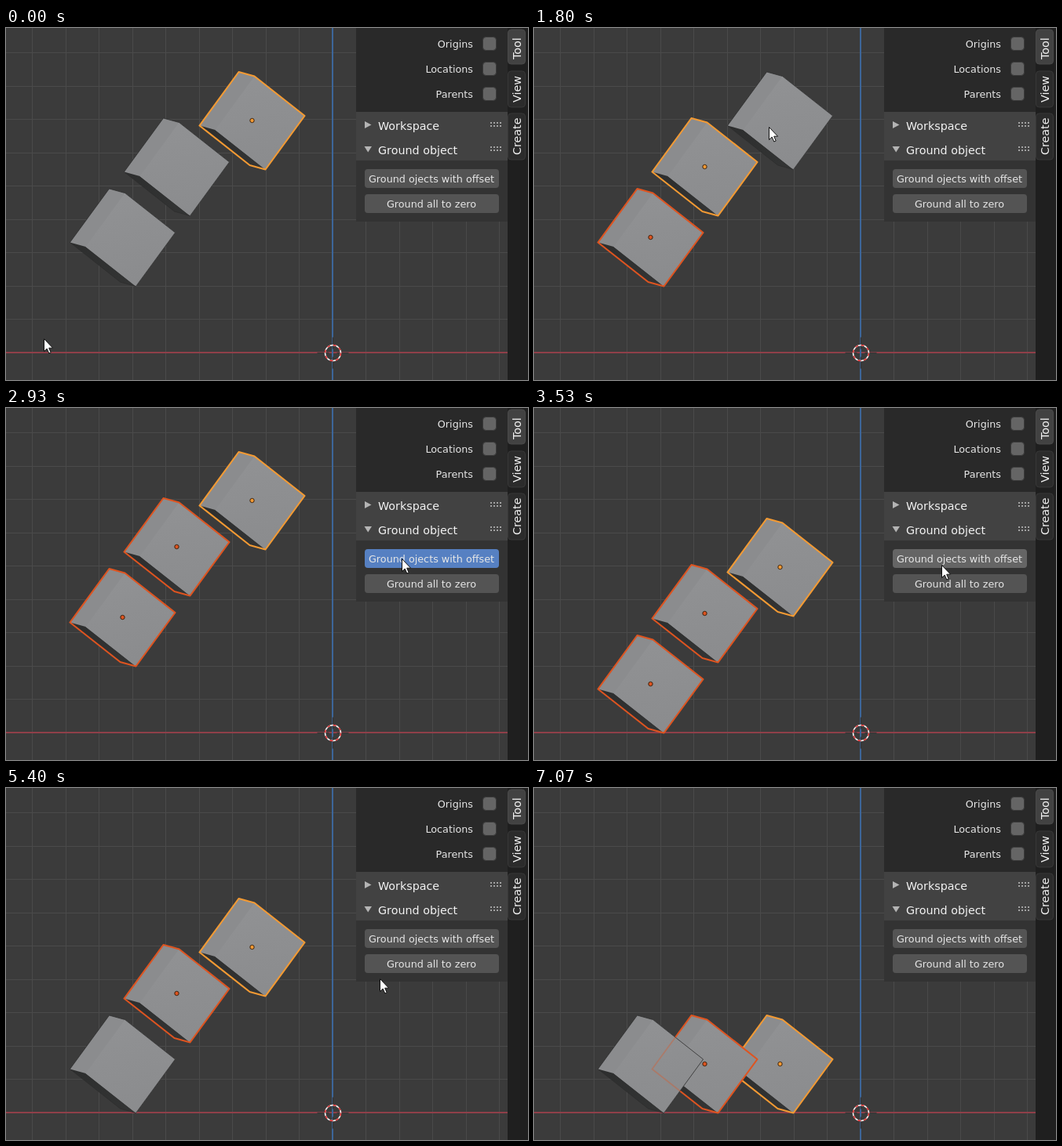
These frames come from a looping animation (665 by 449 pixels, 8190 ms). An HTML page:

```html
<!DOCTYPE html>
<html lang="en">
<head>
<meta charset="utf-8">
<title>Ground object</title>
<style>
  html, body { margin: 0; width: 100%; height: 100%; overflow: hidden; background: #3b3b3b; }
  svg { display: block; width: 665px; height: 449px; }
  text { font-family: "DejaVu Sans", Verdana, sans-serif; fill: #e6e6e6; }
  .item { font-size: 12.75px; }
  .head { font-size: 14.3px; fill: #f2f2f2; }
</style>
</head>
<body>
<svg id="stage" viewBox="0 0 665 449" xmlns="http://www.w3.org/2000/svg">
  <defs>
    <linearGradient id="front" x1="0" y1="0" x2="0.25" y2="1">
      <stop offset="0" stop-color="#919294"/><stop offset="1" stop-color="#8b8c8e"/>
    </linearGradient>
    <linearGradient id="under" x1="0" y1="0" x2="1" y2="1">
      <stop offset="0" stop-color="#292a2a"/><stop offset="1" stop-color="#363737"/>
    </linearGradient>
  </defs>
  <g id="grid"></g>
  <g id="cubes"></g>
  <g id="pivot"></g>
  <g id="panel"></g>
  <path id="arrow" d="M-.5 .5V16.6L3.2 13.1 5.8 19 8.2 18 5.7 12.2H10.6Z" fill="#fff" stroke="#111" stroke-width="1"/>
</svg>
<script>
const $ = id => document.getElementById(id);
const NS = "http://www.w3.org/2000/svg";

function add(parent, tag, attrs, text) {
  const el = document.createElementNS(NS, tag);
  for (const k in attrs) el.setAttribute(k, attrs[k]);
  if (text) el.textContent = text;
  parent.appendChild(el);
  return el;
}
const rect = (p, x, y, width, height, fill, rx = 0) => add(p, "rect", { x, y, width, height, fill, rx });
const line = (p, x1, y1, x2, y2, stroke, w = 1) =>
  add(p, "line", { x1, y1, x2, y2, stroke, "stroke-width": w });
const show = (el, on) => { el.style.display = on ? "" : "none"; };

// Grid, axes and the 3D cursor
const AX = 416, AY = 414, CELL = 42.5;
const grid = $("grid");
for (let i = -9; i <= 5; i++) {
  const x = Math.floor(AX + i * CELL) + 0.5, y = Math.floor(AY + i * CELL) + 0.5;
  line(grid, x, 0, x, 449, "#4a4a4a");
  line(grid, 0, y, 639, y, "#4a4a4a");
}
line(grid, 0, AY, 639, AY, "#8f3f49", 2);
line(grid, AX, 0, AX, 449, "#3d6699", 2);

const pivot = add($("pivot"), "g", { transform: `translate(${AX + 0.5} ${AY + 0.5})` });
for (let turn = 0; turn < 360; turn += 90)
  line(pivot, 5, 0, 20, 0, "#373737", 1.5).setAttribute("transform", `rotate(${turn})`);
const ring = { r: 10, fill: "none", "stroke-width": 1.5 };
add(pivot, "circle", { ...ring, stroke: "#f4f4f4" });
add(pivot, "circle", { ...ring, stroke: "#e02a2a", "stroke-dasharray": 10 * Math.PI / 8 });

// A cube is its top corner plus three projected edges: a narrow, b left, c right
const EDGES = { a: [20, 5.5], b: [-50, 68.5], c: [64, 50.5] };
const corner = name => [...name].reduce(
  ([x, y], e) => EDGES[e] ? [x + EDGES[e][0], y + EDGES[e][1]] : [x, y], [-17, -62]).join();
const face = names => names.split(" ").map(corner).join(" ");
const HULL = face("o a ac abc bc b");

const ORANGE = "#f39a33", RED = "#de5420";
const STEP = 85, FLOOR = 352;
const homes = [[148.5, 267], [217.5, 177], [313.5, 118]];
const layer = $("cubes");
const cubes = homes.map(() => ({}));
for (const c of [...cubes].reverse()) {
  c.g = add(layer, "g", {});
  add(c.g, "polygon", { points: HULL, fill: "url(#under)" });
  add(c.g, "polygon", { points: face("o a ac abc ab b"), fill: "#8b8c8e" });
  add(c.g, "polygon", { points: face("a ac abc ab"), fill: "url(#front)" });
  c.edge = add(c.g, "polygon", { points: HULL, fill: "none", "stroke-linejoin": "round" });
}
// Outline of the middle cube seen faintly through the unselected one
const clip = add(layer, "clipPath", { id: "mask" });
add(clip, "polygon", { points: HULL, transform: `translate(${homes[0][0]} ${FLOOR})` });
const ghost = add(add(layer, "g", { "clip-path": "url(#mask)" }), "polygon", {
  points: HULL, transform: `translate(${homes[1][0]} ${FLOOR})`, fill: "none",
  stroke: RED, "stroke-width": 1.8, opacity: 0.35
});
for (const c of cubes)
  c.dot = add(layer, "circle", { r: 2.7, stroke: "#3a2412", "stroke-width": 1 });

// Side panel
const panel = $("panel");
rect(panel, 446, 0, 193, 107, "#292929");
rect(panel, 446, 107, 193, 62, "#424242");
rect(panel, 446, 169, 193, 78, "#333333");
rect(panel, 639, 0, 26, 449, "#1f1f1f");

["Origins", "Locations", "Parents"].forEach((label, i) => {
  const y = 24.5 + i * 32;
  add(panel, "text", { x: 595, y, class: "item", "text-anchor": "end" }, label);
  rect(panel, 607.5, y - 13, 17, 17, "#656565", 4).setAttribute("stroke", "#3a3a3a");
});
["Workspace", "Ground object"].forEach((label, i) => {
  const y = 129.5 + i * 31;
  add(panel, "text", { x: 474, y, class: "head" }, label);
  for (let k = 0; k < 8; k++)
    rect(panel, 617 + (k % 4) * 4, y - 9.5 + (k >> 2) * 4, 2, 2, "#a2a2a2");
});
add(panel, "path", { d: "M457 119L465.5 123.5 457 128ZM456.5 151H466L461.2 158.5Z", fill: "#b4b4b4" });

const buttons = ["Ground ojects with offset", "Ground all to zero"].map((label, i) => {
  const y = 180 + i * 32;
  const el = rect(panel, 457, y, 171, 24, "#545454", 4);
  add(panel, "text", { x: 542, y: y + 16.5, class: "item", "text-anchor": "middle" }, label);
  return { el, y };
});
[["Tool", 2, 46], ["View", 55, 101], ["Create", 109, 168]].forEach(([label, top, end], i) => {
  const tab = rect(panel, 639.5, top, 22, end - top, i ? "#2b2b2b" : "#424242", 4);
  tab.setAttribute("stroke", i ? "#383838" : "#4a4a4a");
  add(panel, "text", { transform: `translate(656 ${end - 6}) rotate(-90)`, class: "head" }, label);
});

// Times are in ticks of 1/15 s
const LOOP = 8190, TICK = 200 / 3;
const HIDE = 106, GROUND = 45, ZERO = 91;

// Pointer moves: start, end, x, y, downward bow
const START = [49, 396];
const moves = [
  [0, 5, 117, 292], [8, 12, 147, 283], [16, 22, 207, 203], [23, 27, 300, 126],
  [29, 38, 502, 191], [39, 40, 505, 192], [52, 57, 650, 270], [57, 65, 233, 278, 70],
  [74, 78, 310, 209], [78, 81, 477, 243], [81, 85, 504, 226], [99, HIDE, 296, 455]
];
// Selection: tick, then one mark per cube (a = active, s = selected, - = none)
const picks = [[0, "--a"], [15, "a--"], [23, "sa-"], [28, "ssa"], [70, "-a-"], [78, "-sa"]];
// Button presses: down and release tick of each button
const presses = [[43, GROUND], [90, ZERO]];

const ease = u => u * u * (3 - 2 * u);

function pointer(k) {
  let [x, y] = START;
  for (const [from, to, tx, ty, bow = 0] of moves) {
    if (k <= from) break;
    const u = ease(Math.min(1, (k - from) / (to - from)));
    x += (tx - x) * u;
    y += (ty - y) * u + bow * Math.sin(Math.PI * u);
  }
  return [Math.round(x), Math.round(y)];
}

const height = (y, k) => k < GROUND ? y : k < ZERO ? y + STEP : FLOOR;

function buttonColor(i, k, hover) {
  const [down, up] = presses[i];
  if (k >= down && k < up) return "#5680c2";
  const settled = k < down || k >= up + 2;
  return hover && settled ? "#656565" : "#545454";
}

function draw(ms) {
  const k = Math.floor((ms + 4) / TICK);
  const marks = picks.filter(p => p[0] <= k).pop()[1];
  cubes.forEach((c, i) => {
    const [x, y] = homes[i], on = marks[i] !== "-";
    const color = marks[i] === "a" ? ORANGE : RED;
    const at = `translate(${x} ${height(y, k)})`;
    c.g.setAttribute("transform", at);
    c.dot.setAttribute("transform", at);
    c.edge.setAttribute("stroke", on ? color : "rgba(45,45,45,.75)");
    c.edge.setAttribute("stroke-width", on ? 2.1 : 1);
    c.dot.setAttribute("fill", color);
    show(c.dot, on);
  });
  show(ghost, k >= ZERO);

  const [px, py] = pointer(k);
  $("arrow").setAttribute("transform", `translate(${px} ${py})`);
  show($("arrow"), k < HIDE);
  buttons.forEach((b, i) => {
    const hover = px >= 457 && px <= 628 && py >= b.y && py <= b.y + 24;
    b.el.setAttribute("fill", buttonColor(i, k, hover));
  });
}

const start = performance.now();
function frame() {
  draw((performance.now() - start) % LOOP);
  requestAnimationFrame(frame);
}
draw(0);
requestAnimationFrame(frame);
</script>
</body>
</html>
```
